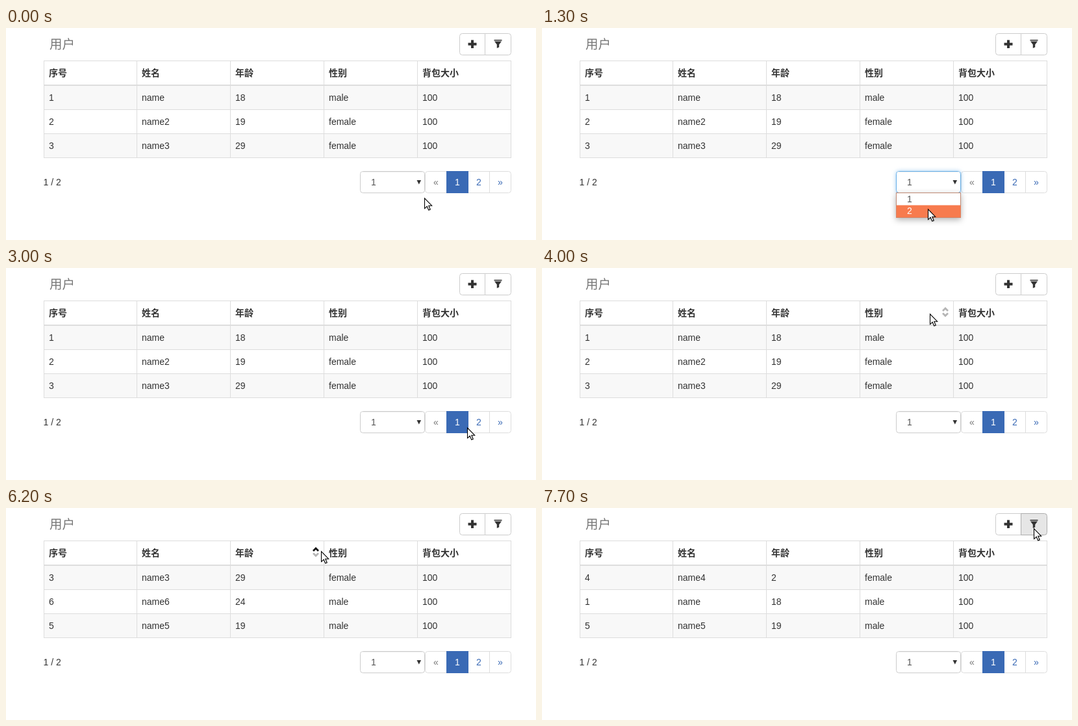
An HTML page for the animation above (8000 ms loop, 816 px wide and 326 px high).

```html
<!DOCTYPE html>
<html lang="zh-CN">
<head>
<meta charset="utf-8">
<style>
html, body { margin: 0; width: 100%; height: 100%; overflow: hidden; background: #fff; }
svg { display: block; font: 14px "Liberation Sans", Arial, "Noto Sans CJK SC", "Noto Sans CJK", sans-serif; }
</style>
</head>
<body>
<svg id="stage" width="816" height="326" viewBox="0 0 816 326"></svg>
<script>
const LOOP = 8000, STEP = 100;
const BLUE = '#3a6ab5', LINE = '#ddd';
const colX = [58, 201, 345, 489, 633];
const heads = ['序号', '姓名', '年龄', '性别', '背包大小'];
const users = [
  [1, 'name', 18, 'male'], [2, 'name2', 19, 'female'], [3, 'name3', 29, 'female'],
  [4, 'name4', 2, 'female'], [5, 'name5', 19, 'male'], [6, 'name6', 24, 'male']
];

// Cursor moves: first step, last step, end point
const start = [644, 261];
const moves = [
  [300, 400, 632, 245], [700, 900, 616, 258], [1000, 1000, 604, 268],
  [1200, 1300, 594, 278], [1800, 1800, 600, 280], [1900, 2100, 679, 264],
  [2300, 2500, 710, 245], [3500, 3500, 720, 232], [3600, 3800, 613, 70],
  [4000, 4700, 482, 72], [5800, 6000, 484, 68], [6200, 6200, 485, 66],
  [7100, 7700, 757, 31]
];

// Table contents: start time, user ids, page
const views = [
  [0, [1, 2, 3], 1], [1500, [4, 5, 6], 2], [3000, [1, 2, 3], 1],
  [5500, [3, 6, 5], 1], [6500, [4, 1, 5], 1]
];

const rect = (x, y, w, h, fill, more = '') =>
  `<rect x="${x}" y="${y}" width="${w}" height="${h}" fill="${fill}" ${more}/>`;
const box = (x, y, w, h, fill, stroke, r = 4) =>
  rect(x + .5, y + .5, w - 1, h - 1, fill, `stroke="${stroke}" rx="${r}"`);
const text = (x, y, s, fill = '#333', more = '') =>
  `<text x="${x}" y="${y}" fill="${fill}" ${more}>${s}</text>`;
const path = (d, fill, more = '') => `<path d="${d}" fill="${fill}" ${more}/>`;
const inside = ([px, py], x, y, w, h) => px >= x && px < x + w && py >= y && py < y + h;

function cursorAt(t) {
  let p = start;
  for (const [a, b, x, y] of moves) {
    if (t < a) break;
    const k = Math.min(1, (t - a + STEP) / (b - a + STEP));
    p = [Math.round(p[0] + (x - p[0]) * k), Math.round(p[1] + (y - p[1]) * k)];
  }
  return p;
}

function button(x, w, d, hot, right) {
  const l = x + .5, r = x + w - .5;
  const shape = right
    ? `M${l} 8.5H${r - 4}q4 0 4 4V37.5q0 4 -4 4H${l}Z`
    : `M${r} 8.5H${l + 4}q-4 0 -4 4V37.5q0 4 4 4H${r}Z`;
  return path(shape, hot ? '#e6e6e6' : '#fff', `stroke="${hot ? '#adadad' : '#ccc'}"`) + path(d, '#333');
}

function toolbar(p) {
  const plus = 'M716 18.5h4v4.3h4.5v4h-4.5v4.2h-4v-4.2h-4.5v-4h4.5z';
  const funnel = 'M751.5 18h12v1.6h-12zM752 20.4h11l-3.8 5v4.2l-3.4 1.4v-5.6z';
  const hot = [inside(p, 698, 8, 40, 34), inside(p, 738, 8, 40, 34)];
  const parts = [button(698, 40, plus, hot[0], false), button(737, 41, funnel, hot[1], true)];
  if (hot[0]) parts.reverse();
  return text(67, 31.5, '用户', '#777', 'font-size="19.5"') + parts.join('');
}

function sorter(i, p) {
  if (!inside(p, colX[i], 51, 144, 36)) return '';
  const x = colX[i] + 128;
  const near = inside(p, x - 5, 51, 19, 36);
  const chevron = (y, dy, on) => path(`M${x} ${y}l4 ${dy}l4 ${-dy}`, 'none',
    `stroke="${on ? '#111' : '#b5b5b5'}" stroke-width="2.8"`);
  return chevron(66, -4, near && p[1] < 70) + chevron(69.5, 4, near && p[1] >= 70);
}

function table(ids, p) {
  let s = '';
  ids.forEach((id, r) => {
    const y = 89 + 37 * r;
    const fill = inside(p, 58, y, 720, 37) ? '#f5f5f5' : r % 2 ? '#fff' : '#f8f8f8';
    s += rect(58, y - 1, 720, 37, fill);
    [...users[id - 1], 100].forEach((v, c) => s += text(colX[c] + 8, y + 23, v));
  });
  heads.forEach((h, c) => s += text(colX[c] + 8, 74, h, '#333', 'font-weight="700"'));
  [...colX, 777].forEach(x => s += rect(x, 50, 1, 150, LINE));
  [50, 125, 162, 199].forEach(y => s += rect(58, y, 720, 1, LINE));
  return s + rect(58, 87, 720, 2, LINE) + sorter(2, p) + sorter(3, p);
}

function pager(page, p) {
  const hot = [0, 1, 2, 3].find(i => inside(p, 645 + 33 * i, 220, 34, 34));
  let s = box(645, 220, 133, 34, '#fff', LINE);
  [678, 711, 744].forEach(x => s += rect(x, 220, 1, 34, LINE));
  ['«', 1, 2, '»'].forEach((v, i) => {
    const x = 645 + 33 * i;
    const off = i === 0 && page === 1 || i === 3 && page === 2;
    let fill = off ? '#777' : BLUE;
    if (i === page) {
      s += rect(x, 220, 34, 34, BLUE);
      fill = '#fff';
    } else if (i === hot && !off) {
      s += rect(x + 1, 221, 32, 32, '#eee');
      fill = '#23527c';
    }
    s += text(x + 13, 242, v, fill);
  });
  return s;
}

function select(t, page) {
  const focus = t >= 600 && t < 1500, open = t >= 700 && t < 1500;
  const glow = focus ? 'style="filter:drop-shadow(0 0 3px rgba(102,175,233,.6))"' : '';
  let s = `<g ${glow}>${box(545, 220, 100, 34, '#fff', focus ? '#66afe9' : '#ccc')}</g>`
    + rect(547, 221, 96, 1, '#eee') + text(562, 242, page, '#555')
    + path('M632.5 234h6.6l-3.3 6.4z', '#333');
  if (open) {
    const pick = t < 1000 ? 0 : 1;
    s += `<g style="filter:drop-shadow(0 3px 5px rgba(0,0,0,.3))">${box(545, 253, 100, 39, '#fff', '#c08a74', 0)}</g>`
      + rect(545.5, 254 + 18.5 * pick, 99, 18.8, '#f77b4e');
    [1, 2].forEach((v, i) => s += text(562, 268 + 18 * i, v, i === pick ? '#fff' : '#555'));
  }
  return s;
}

function cursor([x, y]) {
  const d = 'M.5 .8V16.6L4.2 13.2L6.7 19L9.2 18L6.8 12.2H11.6Z';
  return `<g transform="translate(${x} ${y})">`
    + path(d, '#000', 'opacity=".15" transform="translate(1 1)"')
    + path(d, '#fff', 'stroke="#000" stroke-width="1.1"') + '</g>';
}

const stage = document.getElementById('stage');
let shown = -1;

function draw(now) {
  const t = Math.floor(now % LOOP / STEP) * STEP;
  if (t !== shown) {
    shown = t;
    const p = cursorAt(t);
    const [, ids, page] = views.filter(v => v[0] <= t).pop();
    stage.innerHTML = toolbar(p) + table(ids, p) + text(57.5, 242, `${page} / 2`)
      + pager(page, p) + select(t, page) + cursor(p);
  }
}

let origin;
function tick(now) {
  origin ??= now;
  draw(Math.max(0, now - origin));
  requestAnimationFrame(tick);
}
draw(0);
requestAnimationFrame(tick);
</script>
</body>
</html>
```
